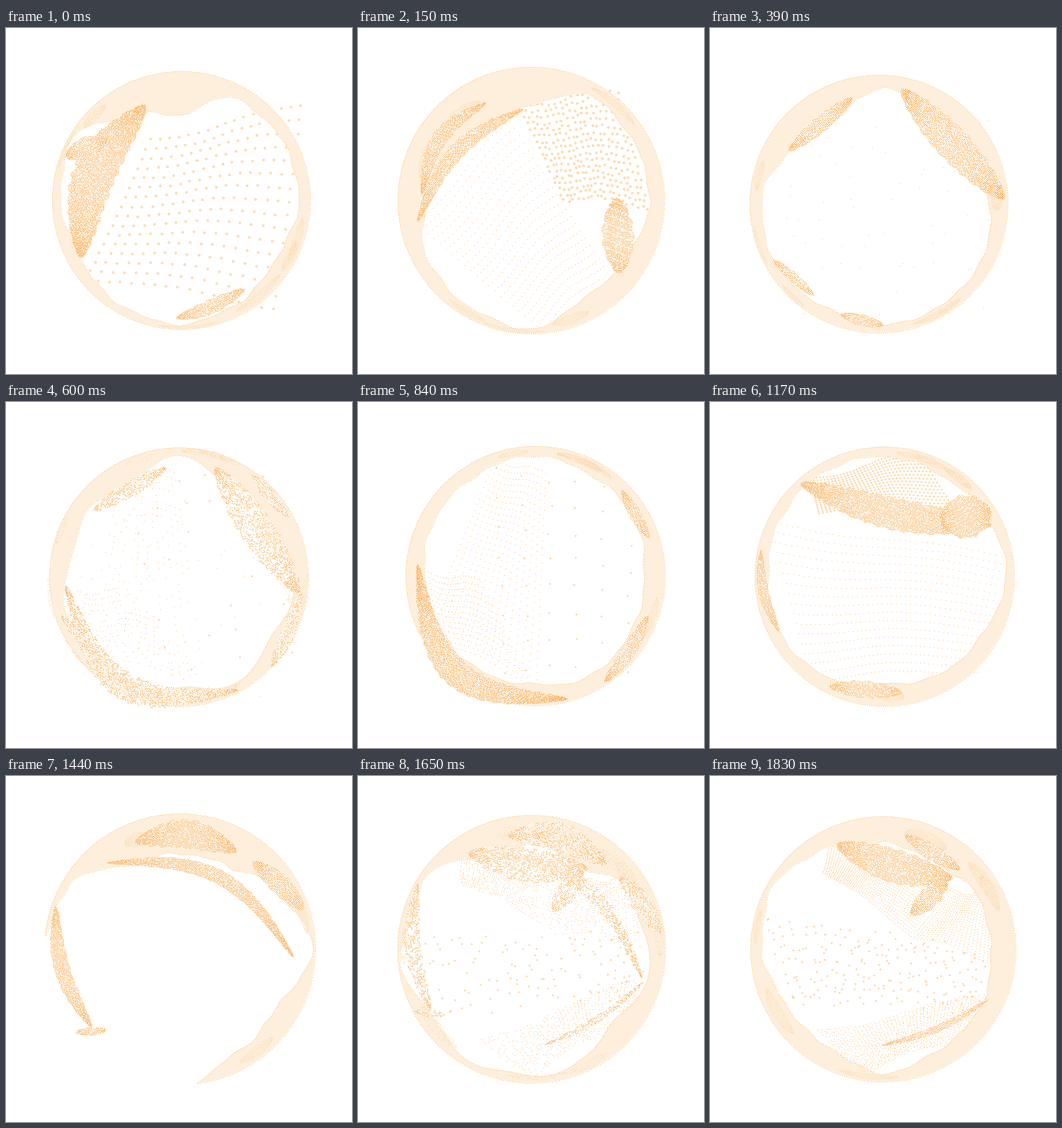
An HTML page with a canvas that plays this animation: 480 by 480 pixels, repeating every 1860 ms.

```html
<!DOCTYPE html>
<html lang="en">
<head>
<meta charset="utf-8">
<title>Particle sphere</title>
<style>
html, body { margin: 0; width: 100%; height: 100%; overflow: hidden; background: #fff; }
canvas { display: block; width: 480px; height: 480px; }
</style>
</head>
<body>
<canvas id="stage" width="480" height="480"></canvas>
<script>
const ctx = document.getElementById('stage').getContext('2d');
const LOOP = 1860, STEP = 30, MID = 240, RAYS = 360, TAU = Math.PI * 2;
const CREAM = '#fdefdc', EDGE = '#fcdcb4', PALE = '#fdc580', ORANGE = '#fbab52';

// rim: outer circle. edge: inner radius of the band every 30 degrees.
// folds: dense lens from one point to another, then bend and width.
// nets: four corners clockwise, columns, rows, jitter, dot radius.
const poses = [
  { t: 0, rim: [243, 239, 179],
    edge: [166, 156, 163, 171, 165, 159, 164, 172, 138, 118, 163, 166],
    folds: [[192, 106, 102, 318, 27, 56], [82, 178, 140, 153, 0, 28], [236, 402, 330, 362, 4, 18]],
    nets: [[[200, 155], [410, 110], [370, 385], [110, 345], 17, 16, 1, 1.3]] },
  { t: 150, rim: [240, 239, 185],
    edge: [164, 154, 152, 177, 170, 165, 148, 120, 116, 133, 168, 164],
    folds: [[228, 112, 82, 268, 27, 20], [88, 230, 177, 103, -24, 20], [358, 235, 362, 340, 0, 42]],
    nets: [[[80, 270], [210, 130], [345, 335], [255, 415], 24, 22, 0, 0],
      [[222, 105], [360, 90], [400, 245], [285, 235], 18, 17, 2, 1.3]] },
  { t: 390, rim: [234, 244, 179],
    edge: [147, 159, 165, 172, 168, 172, 169, 148, 131, 157, 138, 114],
    folds: [[265, 84, 408, 237, 0, 44], [108, 170, 197, 96, 0, 20], [88, 322, 143, 370, 0, 12], [180, 397, 240, 412, 0, 14]],
    nets: [[[90, 150], [370, 150], [370, 380], [110, 380], 8, 8, 24, 0]] },
  { t: 840, rim: [246, 241, 180],
    edge: [157, 159, 162, 151, 150, 146, 148, 155, 158, 166, 162, 163],
    folds: [[82, 225, 290, 412, 76, 36], [365, 122, 403, 188, 0, 15], [342, 388, 402, 296, 4, 18]],
    nets: [[[190, 78], [260, 100], [245, 390], [95, 300], 16, 30, 0, 0],
      [[97, 235], [170, 250], [238, 388], [110, 330], 20, 14, 0, 0],
      [[190, 90], [380, 130], [370, 370], [200, 370], 6, 8, 3, .8]] },
  { t: 1170, rim: [242, 242, 180],
    edge: [171, 160, 158, 150, 162, 164, 160, 163, 165, 165, 160, 165],
    folds: [[125, 112, 390, 170, 14, 42], [318, 165, 390, 152, 0, 58], [165, 394, 266, 403, 0, 22], [70, 205, 95, 318, 9, 13]],
    nets: [[[82, 165], [405, 215], [370, 370], [140, 385], 42, 17, 0, 0],
      [[138, 105], [290, 72], [335, 140], [150, 150], 34, 16, 0, .8]] },
  { t: 1440, rim: [241, 240, 188],
    edge: [185, 157, 163, 190, 190, 190, 188, 176, 136, 132, 133, 160],
    folds: [[178, 90, 320, 104, -17, 38], [342, 118, 412, 185, -3, 26], [140, 120, 398, 250, -52, 18],
      [68, 180, 118, 348, 16, 20], [97, 355, 138, 352, 0, 10]],
    nets: [] },
  { t: 1830, rim: [240, 240, 184],
    edge: [149, 157, 159, 172, 155, 155, 168, 176, 161, 148, 139, 150],
    folds: [[175, 94, 335, 142, 6, 44], [278, 192, 328, 146, 0, 26], [270, 82, 346, 129, 0, 20], [238, 373, 385, 310, 9, 8]],
    nets: [[[165, 95], [330, 140], [275, 215], [155, 130], 46, 22, 0, 0],
      [[335, 155], [392, 170], [388, 255], [275, 220], 22, 24, 0, 0],
      [[75, 195], [385, 250], [380, 320], [110, 310], 24, 9, 8, .8],
      [[150, 352], [385, 305], [350, 360], [210, 412], 44, 22, 1, 0]] }
];

const mix = (a, b, f) => a + (b - a) * f;

function hash(a, b) {
  const s = Math.sin(a * 127.1 + b * 311.7) * 43758.5453;
  return s - Math.floor(s);
}

// Inner radius per ray: eased between the given ones, with a ragged ripple.
function ragged(edge, seed) {
  return Array.from({ length: RAYS }, (_, k) => {
    const s = k / RAYS * edge.length, i = Math.floor(s), f = s - i;
    const a = k / RAYS * TAU;
    const ripple = 2 * Math.sin(a * 17 + seed) * Math.sin(a * 5 + seed * 2);
    return mix(edge[i], edge[(i + 1) % edge.length], f * f * (3 - 2 * f)) + ripple;
  });
}

// Lens-shaped sheet; centre(u) gives x, y and the unit normal.
function lens(centre, length, width, seed, soft) {
  const dots = [], left = [], right = [];
  const cols = Math.ceil(length / 2.2), rows = Math.ceil(width / 2.1);
  for (let i = 0; i <= cols; i++) {
    const u = i / cols, [x, y, nx, ny] = centre(u);
    const half = width / 2 * Math.pow(Math.sin(Math.PI * u), .6);
    const at = v => [x + nx * half * v, y + ny * half * v];
    left.push(at(-1));
    right.unshift(at(1));
    for (let j = 0; j <= rows; j++) {
      const v = j / rows * 2 - 1 + .06 * Math.sin(i * .7);
      dots.push([...at(v), hash(i * 71 + j, seed)]);
    }
  }
  return { dots, shape: left.concat(right), soft };
}

function buildFold([x0, y0, x1, y1, bend, width], seed) {
  const dx = x1 - x0, dy = y1 - y0, len = Math.hypot(dx, dy);
  const nx = -dy / len, ny = dx / len;
  return lens(u => {
    const b = bend * Math.sin(Math.PI * u);
    return [x0 + dx * u + nx * b, y0 + dy * u + ny * b, nx, ny];
  }, len + Math.abs(bend), width, seed, false);
}

// Faint streak lying inside the band at a seeded angle.
function buildStreak(pose, seed) {
  const from = hash(seed, 5) * TAU, span = .2 + .3 * hash(seed, 6);
  const [cx, cy, r] = pose.rim;
  const mid = Math.floor((from + span / 2) / TAU * RAYS) % RAYS;
  const depth = Math.max(0, r - pose.radii[mid]);
  return lens(u => {
    const a = from + span * u, c = Math.cos(a), s = Math.sin(a), d = r - depth * .45;
    return [cx + c * d, cy + s * d, c, s];
  }, span * r, Math.min(18, depth * .5), seed, true);
}

function buildNet([a, b, c, d, cols, rows, jitter, size], seed) {
  const dots = [];
  for (let i = 0; i < cols; i++) for (let j = 0; j < rows; j++) {
    const u = i / (cols - 1), v = j / (rows - 1), key = i * 71 + j + seed;
    const sway = 5 * Math.sin(u * 6 + v * 2);
    const [x, y] = [0, 1].map(k => mix(mix(a[k], b[k], u), mix(d[k], c[k], u), v)
      + (hash(key, k + 1) - .5) * 2 * jitter);
    dots.push([x + sway * .3, y + sway, hash(key, 3)]);
  }
  return { dots, size };
}

poses.forEach((p, n) => {
  p.radii = ragged(p.edge, n);
  p.meshes = p.nets.map(buildNet);
  p.sheets = p.folds.map(buildFold);
  for (let k = 0; k < 6; k++) p.sheets.unshift(buildStreak(p, n * 10 + k + 1));
});

function trace(pts) {
  pts.forEach(([x, y], i) => i ? ctx.lineTo(x, y) : ctx.moveTo(x, y));
  ctx.closePath();
}

function drawBand(a, b, f, t) {
  const [cx, cy, r] = a.rim.map((v, i) => mix(v, b.rim[i], f));
  const swell = Math.sin(Math.PI * f) * 6, dx = cx - MID, dy = cy - MID;
  const outer = [], inner = [];
  for (let k = 0; k < RAYS; k++) {
    const ang = k / RAYS * TAU, c = Math.cos(ang), s = Math.sin(ang);
    const dot = dx * c + dy * s;
    const far = dot + Math.sqrt(dot * dot + r * r - dx * dx - dy * dy);
    const wave = swell * Math.sin(ang * 7 + t / 90);
    const near = Math.min(far, mix(a.radii[k], b.radii[k], f) + wave);
    outer.push([MID + c * far, MID + s * far, far - near]);
    inner.push([MID + c * near, MID + s * near]);
  }
  ctx.beginPath();
  trace(outer);
  trace(inner);
  ctx.fillStyle = CREAM;
  ctx.fill('evenodd');
  ctx.fillStyle = PALE;
  outer.forEach((p, k) => {
    if (p[2] < .5) return;
    for (const [x, y] of [p, inner[k]]) ctx.fillRect(Math.round(x), Math.round(y), 1, 1);
  });
}

// Runs paint inside the frame of a pose turned about the middle.
function spinner(turn) {
  const c = Math.cos(turn), s = Math.sin(turn);
  return ([x, y]) => [MID + (x - MID) * c - (y - MID) * s, MID + (x - MID) * s + (y - MID) * c];
}

function specks(pts, size, colour) {
  ctx.fillStyle = colour;
  for (const [x, y] of pts) ctx.fillRect(Math.round(x), Math.round(y), size, size);
}

function drawNets(pose, weight, turn) {
  const spin = spinner(turn);
  for (const { dots, size } of pose.meshes) {
    const pts = dots.filter(d => d[2] < weight).map(spin);
    if (!size) {
      specks(pts, 1, PALE);
      continue;
    }
    ctx.beginPath();
    for (const [x, y] of pts) {
      ctx.moveTo(x + size, y);
      ctx.arc(x, y, size, 0, TAU);
    }
    ctx.fillStyle = CREAM;
    ctx.fill();
    ctx.strokeStyle = PALE;
    ctx.lineWidth = .9;
    ctx.stroke();
  }
}

function drawSheets(pose, weight, turn) {
  const spin = spinner(turn);
  for (const { dots, shape, soft } of pose.sheets) {
    const shown = dots.filter(d => d[2] < weight);
    if (soft) {
      specks(shown.map(spin), 1, EDGE);
      continue;
    }
    ctx.globalAlpha = weight * .7;
    ctx.fillStyle = '#fff';
    ctx.beginPath();
    trace(shape.map(spin));
    ctx.fill();
    ctx.globalAlpha = 1;
    specks(shown.map(spin), 2, CREAM);
    specks(shown.filter(d => d[2] < weight * .8).map(spin), 1, ORANGE);
  }
}

function draw(t) {
  let n = poses.length - 1;
  while (poses[n].t > t) n--;
  const a = poses[n], b = poses[n + 1] || a;
  const f = a === b ? 0 : (t - a.t) / (b.t - a.t);
  const both = paint => {
    paint(a, 1 - f, .35 * f);
    if (f) paint(b, f, .35 * (f - 1));
  };
  ctx.fillStyle = '#fff';
  ctx.fillRect(0, 0, 480, 480);
  both(drawNets);
  drawBand(a, b, f, t);
  both(drawSheets);
}

const start = performance.now();
function tick() {
  const t = (performance.now() - start) % LOOP;
  draw(Math.floor(t / STEP) * STEP);
  requestAnimationFrame(tick);
}
tick();
</script>
</body>
</html>
```
